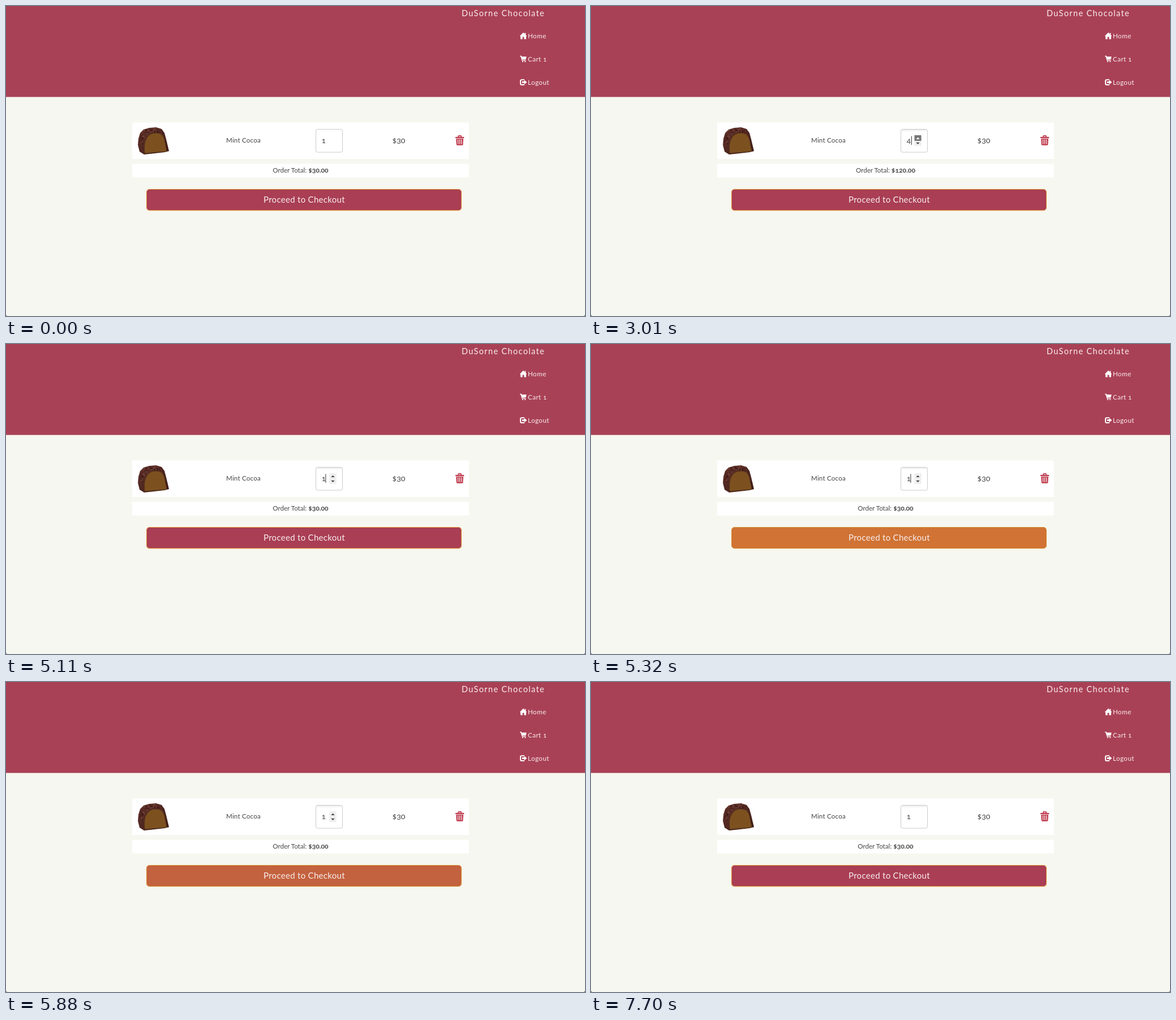
An HTML page that plays this animation: 1023x547 px, repeating every 7770 ms.

```html
<!DOCTYPE html>
<html lang="en">
<head>
<meta charset="utf-8">
<title>Cart</title>
<style>
  html, body { margin: 0; width: 100%; height: 100%; overflow: hidden; background: #f6f7f0; }
  svg { display: block; width: 100%; height: 100%; }
  text { font: 11.6px Lato, "Open Sans", sans-serif; font-variant-numeric: oldstyle-nums; fill: #444; }
  .brand { font-size: 14.5px; letter-spacing: 1.35px; fill: #f9eef0; }
  .nav text { fill: #f9eef0; letter-spacing: .45px; }
  .nav path { fill: #fff; }
  .product { letter-spacing: .2px; }
  .qty { font-size: 13.4px; }
  .price { font-size: 14.2px; }
  .sum { text-anchor: middle; }
  .sum tspan { font-size: 12.1px; font-weight: 700; }
  .label { font-size: 15px; letter-spacing: .3px; fill: #f9eef0; }
</style>
</head>
<body>
<svg viewBox="0 0 1023 547" xmlns="http://www.w3.org/2000/svg">
  <defs>
    <filter id="glow" x="-5%" y="-30%" width="110%" height="160%"><feGaussianBlur stdDeviation="1.2"/></filter>
    <linearGradient id="inset" x1="0" y1="0" x2="0" y2="1">
      <stop offset="0" stop-color="#000" stop-opacity=".08"/>
      <stop offset="1" stop-color="#000" stop-opacity="0"/>
    </linearGradient>
    <linearGradient id="shell" x1="0" y1="0" x2="1" y2="1">
      <stop offset="0" stop-color="#63342b"/>
      <stop offset="1" stop-color="#3a1a15"/>
    </linearGradient>
  </defs>

  <rect width="1023" height="547" fill="#f6f7f0"/>
  <rect width="1023" height="160.500" fill="#a94156"/>
  <path d="M0 0h3Q0 0 0 3zM0 547v-3Q0 547 3 547zM1023 547h-3Q1023 547 1023 544z" fill="#555"/>

  <text class="brand" x="805" y="18">DuSorne Chocolate</text>
  <g class="nav">
    <path d="M914 46.800l2.600 2.500v-1.700h1.700v3.400l2.200 2.200h-1.600v5.200h-3.500v-3.800h-2.800v3.800h-3.500v-5.200h-1.600z"/>
    <text x="922" y="57.300">Home</text>
    <path d="M908 87.800h2.700l.6 1.500h8.400l-1.300 5.200h-6l.3 1h5.800v1.300h-6.800l-2.300-7.600H908z"/>
    <path d="M912 97.200h1.800v1.900H912zM916.400 97.200h1.800v1.900h-1.800z"/>
    <text x="922" y="98.200">Cart 1</text>
    <path d="M916 129.300v1.800h-4.300q-1.700 0-1.700 1.700v3.600q0 1.700 1.700 1.700h4.300v1.800h-4.800q-3.200 0-3.200-3.200v-4.200q0-3.200 3.200-3.200z"/>
    <path d="M915.600 130.600l4.800 4-4.800 4v-2.500h-3.800v-3h3.800z"/>
    <text x="922" y="139">Logout</text>
  </g>

  <rect x="223" y="205.500" width="595" height="64.500" rx="2" fill="#fff"/>
  <rect x="223" y="278.500" width="595" height="24" rx="1" fill="#fff"/>

  <path d="M233 245l1-11 3-10 6-6 10-3 12-1 10 3 5 7 3 11 4 17 1 4-8 2-36 4-8-5z" fill="url(#shell)"/>
  <g id="flakes" stroke-width="1.4" stroke-linecap="round"></g>
  <path d="M245 260q-2-18 3-26 5-10 17-10 12 0 15 12l4 20-4 1z" fill="#7c511f" stroke="#54301c"/>

  <text class="product" x="389" y="241.300">Mint Cocoa</text>

  <rect x="547.500" y="217.500" width="47" height="40.500" rx="3" fill="#fff" stroke="#ccc"/>
  <rect id="focus" x="548" y="218" width="46" height="4" rx="2" fill="url(#inset)"/>
  <text class="qty" id="qty" x="557.800" y="242.300"></text>
  <rect id="caret" y="229.500" width="1.100" height="15.500" fill="#444"/>
  <g id="spinner">
    <rect x="571.500" y="228" width="12" height="19" fill="#efefef"/>
    <rect id="upBox" x="571.500" y="228" width="12" height="10"/>
    <rect id="downBox" x="571.500" y="238" width="12" height="9"/>
    <path id="upArrow" d="M574.300 234.900h6.400l-3.200-3.200z"/>
    <path id="downArrow" d="M574.300 240.800h6.400l-3.200 3.200z"/>
  </g>

  <text class="price" x="682.500" y="242">$30</text>
  <g fill="#bd3549">
    <path d="M798.300 231v-1.300q0-1.400 1.400-1.400h4q1.400 0 1.400 1.400v1.300h4.200v2.200h-15.200V231zm1.600 0h3.600v-1.100h-3.600z"/>
    <path d="M795.300 234.200h12.800l-.7 10q-.2 1.600-1.700 1.600h-8q-1.500 0-1.700-1.600z"/>
    <path d="M798.600 235.500v8.300M801.700 235.500v8.300M804.800 235.500v8.300" stroke="#fff" stroke-width="1.200"/>
  </g>

  <text class="sum" x="520.500" y="294.300">Order Total: <tspan id="total"></tspan></text>

  <rect id="halo" x="248.500" y="324" width="556" height="37" rx="5" fill="#eb981f" filter="url(#glow)"/>
  <rect id="button" x="248.500" y="323.500" width="556" height="37" rx="5"/>
  <text class="label" x="455" y="347">Proceed to Checkout</text>
</svg>

<script>
const LOOP = 7770;
const UNIT_PRICE = 30;

// Each track lists [start time in ms, value]; a value holds until the next start.
const tracks = {
  quantity: [[0, 1], [2240, 2], [2660, 3], [3010, 4], [3850, 3], [4060, 2], [4970, 1]],
  focus: [[0, 0], [2240, 1]],
  caret: [[0, 0], [2240, 1], [3570, 0], [3850, 1], [4620, 0], [4830, 1],
          [5460, 0], [5950, 1], [6440, 0], [6930, 1], [7490, 0]],
  spinner: [[0, 0], [1680, 1], [7700, 0]],
  up: [[0, "idle"], [1680, "hover"], [2240, "press"], [2310, "hover"], [2660, "press"],
       [2800, "hover"], [3010, "press"], [3150, "hover"], [3430, "idle"]],
  down: [[0, "idle"], [3430, "hover"], [3850, "press"], [3920, "hover"], [4060, "press"],
         [4270, "hover"], [4830, "press"], [4970, "hover"], [5110, "idle"]],
  warmth: [[0, 0], [5250, .2], [5320, .6], [5390, .9], [5460, 1], [5880, .4], [5950, 0]]
};
const arrowStyles = {
  idle: ["#efefef", "#444"],
  hover: ["#c4c4c4", "#444"],
  press: ["#777", "#fff"]
};

const el = id => document.getElementById(id);
const valueAt = (name, t) => tracks[name].findLast(([start]) => start <= t)[1];
const show = (id, on) => el(id).setAttribute("visibility", on ? "visible" : "hidden");
const mix = (a, b, k) => `rgb(${a.map((v, i) => Math.round(v + (b[i] - v) * k))})`;

function paintArrow(name, state) {
  const [box, arrow] = arrowStyles[state];
  el(name + "Box").setAttribute("fill", box);
  el(name + "Arrow").setAttribute("fill", arrow);
}

function sprinkleFlakes() {
  let seed = 17;
  const random = () => (seed = seed * 16807 % 2147483647) / 2147483647;
  const colors = ["#351512", "#5b2a24", "#7d4a42", "#431d1a"];
  let marks = "";
  for (let i = 0; i < 100; i++) {
    const angle = Math.PI * (.95 + random() * .85);
    const reach = .72 + random() * .28;
    const x = 258 + 23 * reach * Math.cos(angle);
    const y = 239 + 23 * reach * Math.sin(angle);
    const dx = random() * 4 - 2, dy = random() * 4 - 2;
    marks += `<path d="M${x} ${y}l${dx} ${dy}" stroke="${colors[i % colors.length]}"/>`;
  }
  el("flakes").innerHTML = marks;
}

function render(t) {
  const quantity = valueAt("quantity", t);
  el("qty").textContent = quantity;
  el("total").textContent = "$" + (quantity * UNIT_PRICE).toFixed(2);
  el("caret").setAttribute("x", quantity === 1 ? 564.3 : 565.8);
  for (const id of ["focus", "caret", "spinner"]) show(id, valueAt(id, t));
  for (const name of ["up", "down"]) paintArrow(name, valueAt(name, t));

  const warmth = valueAt("warmth", t);
  el("button").setAttribute("fill", mix([169, 62, 84], [234, 151, 30], warmth));
  el("button").setAttribute("stroke", mix([222, 139, 62], [205, 137, 38], warmth));
  el("halo").setAttribute("opacity", .5 * (1 - warmth));
}

sprinkleFlakes();
const origin = performance.now();
function tick() {
  render((performance.now() - origin) % LOOP);
  requestAnimationFrame(tick);
}
tick();
</script>
</body>
</html>
```
